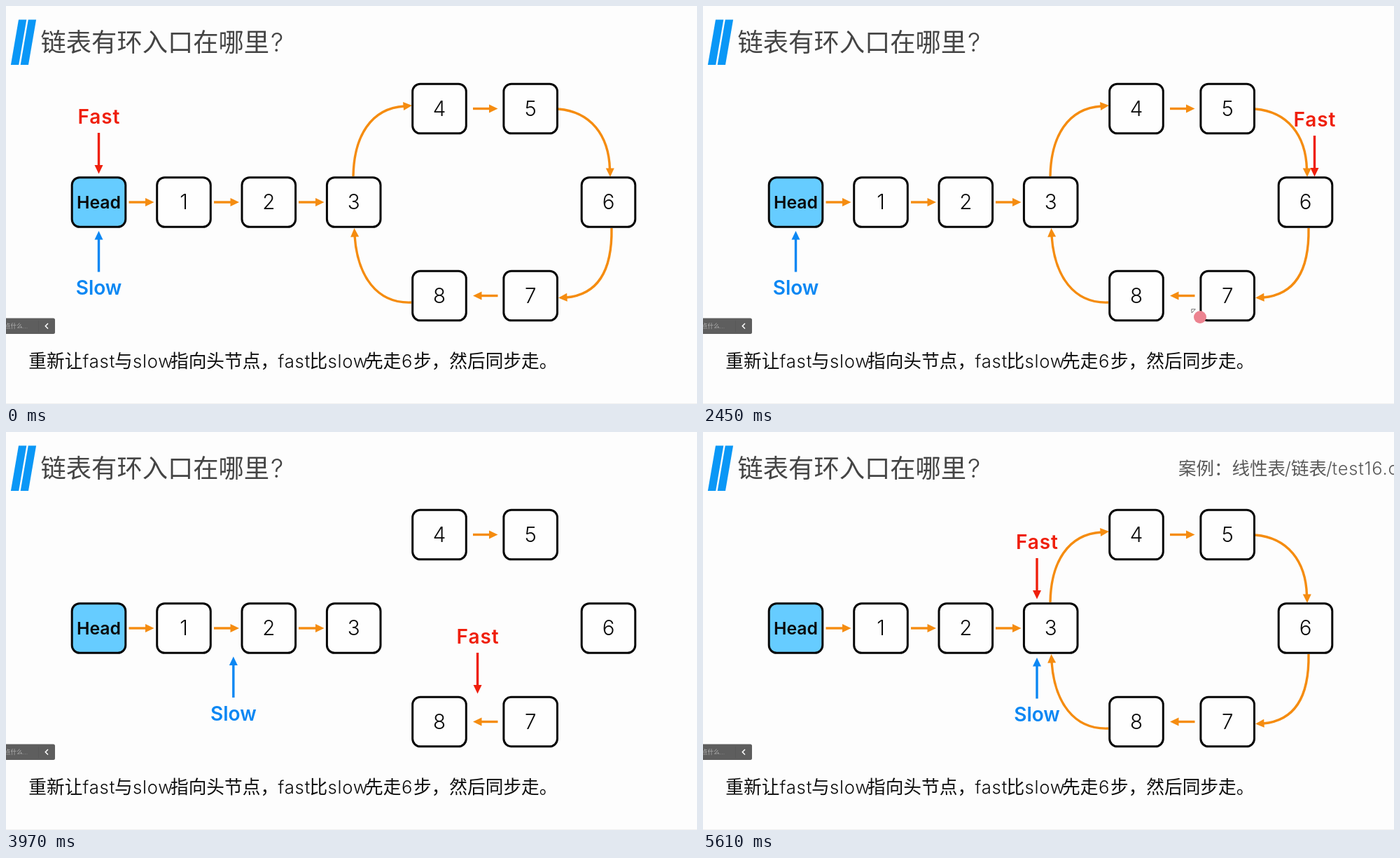
An HTML page that plays this animation: 987 px wide and 568 px high, repeating every 6900 ms.

```html
<!DOCTYPE html>
<html lang="zh-CN">
<head>
<meta charset="utf-8">
<title>链表有环入口在哪里?</title>
<style>
  html, body { margin: 0; width: 100%; height: 100%; overflow: hidden; background: #fdfdfd; }
  svg { display: block; width: 987px; height: 568px; }
  text {
    font-family: Inter, "Noto Sans CJK SC", "Noto Sans CJK", sans-serif;
    font-weight: 300;
    font-optical-sizing: none;
  }
  .mid { text-anchor: middle; }
  .bold { font-weight: 600; }
  .latin { letter-spacing: .03em; }
</style>
</head>
<body>
<svg id="stage" viewBox="0 0 987 568" xmlns="http://www.w3.org/2000/svg"></svg>
<script>
const NS = 'http://www.w3.org/2000/svg';
const stage = document.getElementById('stage');
const ORANGE = '#f58c10', RED = '#ef1f0c', BLUE = '#0b87f3';
const LOOP = 6900, MOVE = 700;

function add(parent, tag, attrs, content) {
  const el = document.createElementNS(NS, tag);
  for (const key in attrs) el.setAttribute(key, attrs[key]);
  if (content) el.textContent = content;
  parent.appendChild(el);
  return el;
}
const group = () => add(stage, 'g', {});

// Text laid out as runs, each with its own start
function runs(parent, y, size, fill, parts) {
  for (const [x, str] of parts) {
    const cls = /[a-z]/.test(str) ? 'latin' : '';
    add(parent, 'text', { x, y, 'font-size': size, fill, class: cls }, str);
  }
}

// A stroked path that ends in a filled head; angle in degrees
function arrow(parent, d, x, y, angle, color) {
  add(parent, 'path', { d, fill: 'none', stroke: color, 'stroke-width': 3.4 });
  add(parent, 'path', {
    d: 'M0 0L-12.5 -6V6Z', fill: color,
    transform: `translate(${x} ${y}) rotate(${angle})`
  });
}
function flat(x1, x2, y) {
  const dir = Math.sign(x2 - x1);
  arrow(stage, `M${x1} ${y}H${x2 - dir * 11}`, x2, y, dir > 0 ? 0 : 180, ORANGE);
}

// Heading
for (const dx of [0, 13.8])
  add(stage, 'path', { d: 'M18 19.5H29.3L18.2 84H6.9Z', fill: '#0a97f6', transform: `translate(${dx} 0)` });
runs(stage, 64.5, 36.3, '#444', [[49.5, '链表有环入口在哪里'], [378, '?']]);

// Ring links
const ring = group();
arrow(ring, 'M496 243C497 186 521 146 569 143', 580, 142, -5, ORANGE);
arrow(ring, 'M789 147C835 151 861 184 862.5 233', 863, 244, 89, ORANGE);
arrow(ring, 'M865 317C866 376 846 412 800 416', 789, 416.5, 177, ORANGE);
arrow(ring, 'M579 423C530 425 502 386 498 328', 497.5, 317, -93, ORANGE);

// Straight links
flat(175.5, 211.5, 280);
flat(297, 333, 280);
flat(418, 454.5, 280);
flat(667, 702.5, 146.5);
flat(702.5, 667, 413.5);

// Nodes
const nodes = [
  ['Head', 132.5, 280], ['1', 254, 280], ['2', 375.3, 280], ['3', 496.7, 280],
  ['4', 619, 146.5], ['5', 749.2, 146.5], ['6', 860.5, 280], ['7', 749.2, 413.5], ['8', 619, 413.5]
];
for (const [name, x, y] of nodes) {
  const head = name === 'Head';
  add(stage, 'rect', {
    x: x - 38.3, y: y - 35.3, width: 76.6, height: 70.6, rx: 11,
    fill: head ? '#66ccff' : '#fefefe', stroke: '#050505', 'stroke-width': 3
  });
  add(stage, 'text', {
    x, y: y + (head ? 8.8 : 10.3), 'font-size': head ? 24.8 : 29.5,
    class: head ? 'mid bold' : 'mid', fill: '#0a0a0a'
  }, name);
}

// Footer
runs(stage, 516, 25.7, '#0c0c0c', [
  [32.3, '重新让'], [109.5, 'fast'], [155, '与'], [181, 'slow'], [235, '指向头节点，'],
  [388.5, 'fast'], [433.5, '比'], [459.5, 'slow'], [513, '先走'], [565, '6'], [582, '步，然后同步走。']
]);
add(stage, 'rect', { x: 0, y: 567, width: 987, height: 1, fill: '#f0f0f0' });

// Side tab
add(stage, 'rect', { x: -5, y: 445.5, width: 75, height: 22.5, rx: 2.5, fill: '#5e5e5e' });
add(stage, 'path', { d: 'M46.5 449V465', stroke: '#585858' });
runs(stage, 460, 8.6, '#b4b4b4', [[-2, '点什么...']]);
add(stage, 'path', { d: 'M60 453L56.3 456.8L60 460.6', fill: 'none', stroke: '#fff', 'stroke-width': 1.5 });

// File note
const note = group();
runs(note, 60.5, 25.5, '#595959', [
  [679, '案例：'], [755.5, '线性表'], [831, '/'], [840, '链表'], [890, '/'], [898.5, 'test16.c']
]);

// Pointer labels, centred on their text
function label(name, color, from, tip, spacing) {
  const g = group();
  const dir = Math.sign(tip);
  add(g, 'text', {
    x: spacing / 2, y: 10.2, 'font-size': 28, 'letter-spacing': spacing, class: 'mid bold', fill: color
  }, name);
  arrow(g, `M0 ${from}V${tip - dir * 11}`, 0, tip, dir * 90, color);
  return g;
}
const fast = label('Fast', RED, 23, 81.5, .9);
const slow = label('Slow', BLUE, -22.5, -81, 0);

// Mouse cursor with a round companion
const cursor = group();
add(cursor, 'path', { d: 'M.7 .7H6.3L1.2 6Z', fill: '#fff', stroke: '#666', 'stroke-width': .9 });
add(cursor, 'circle', { cx: 13, cy: 12, r: 9, fill: '#ec8390' });

const starts = [1485, 2908, 3602, 4380];
const fastStops = [[132.5, 158], [873.5, 162], [748, 292], [619, 292], [477, 157]];
const slowStops = [[132.5, 402], [132.5, 402], [255, 401.5], [376, 401.5], [477, 403]];

const clamp = v => Math.max(0, Math.min(1, v));
const ease = p => p < .5 ? 4 * p ** 3 : 1 - 4 * (1 - p) ** 3;
const place = (el, x, y) => el.setAttribute('transform', `translate(${x.toFixed(2)} ${y.toFixed(2)})`);

function follow(el, stops, step, k) {
  const a = stops[step], b = stops[step + 1];
  place(el, a[0] + (b[0] - a[0]) * k, a[1] + (b[1] - a[1]) * k);
}

function drawCursor(t) {
  const shown = t >= 330 && t < 3780;
  cursor.setAttribute('visibility', shown ? 'visible' : 'hidden');
  if (!shown) return;
  const left = (1 - clamp((t - 310) / 540)) ** 3;
  const drop = .00085 * Math.max(0, t - 3330) ** 2;
  place(cursor, 697 - 56 * left + drop * .2, 432 + 136 * left + drop);
}

function draw(t) {
  let step = 0;
  while (step < 3 && t >= starts[step + 1]) step++;
  const p = clamp((t - starts[step]) / MOVE);
  follow(fast, fastStops, step, ease(p));
  follow(slow, slowStops, step, ease(p));

  // Links fade out early in a move and return in its second half
  const fadeIn = clamp((p - .55) / .45);
  ring.setAttribute('opacity', Math.max(1 - p / .3, fadeIn));
  note.setAttribute('opacity', step === 3 ? fadeIn : 0);
  drawCursor(t);
}

const begin = performance.now();
function tick() {
  draw((performance.now() - begin) % LOOP);
  requestAnimationFrame(tick);
}
tick();
</script>
</body>
</html>
```
